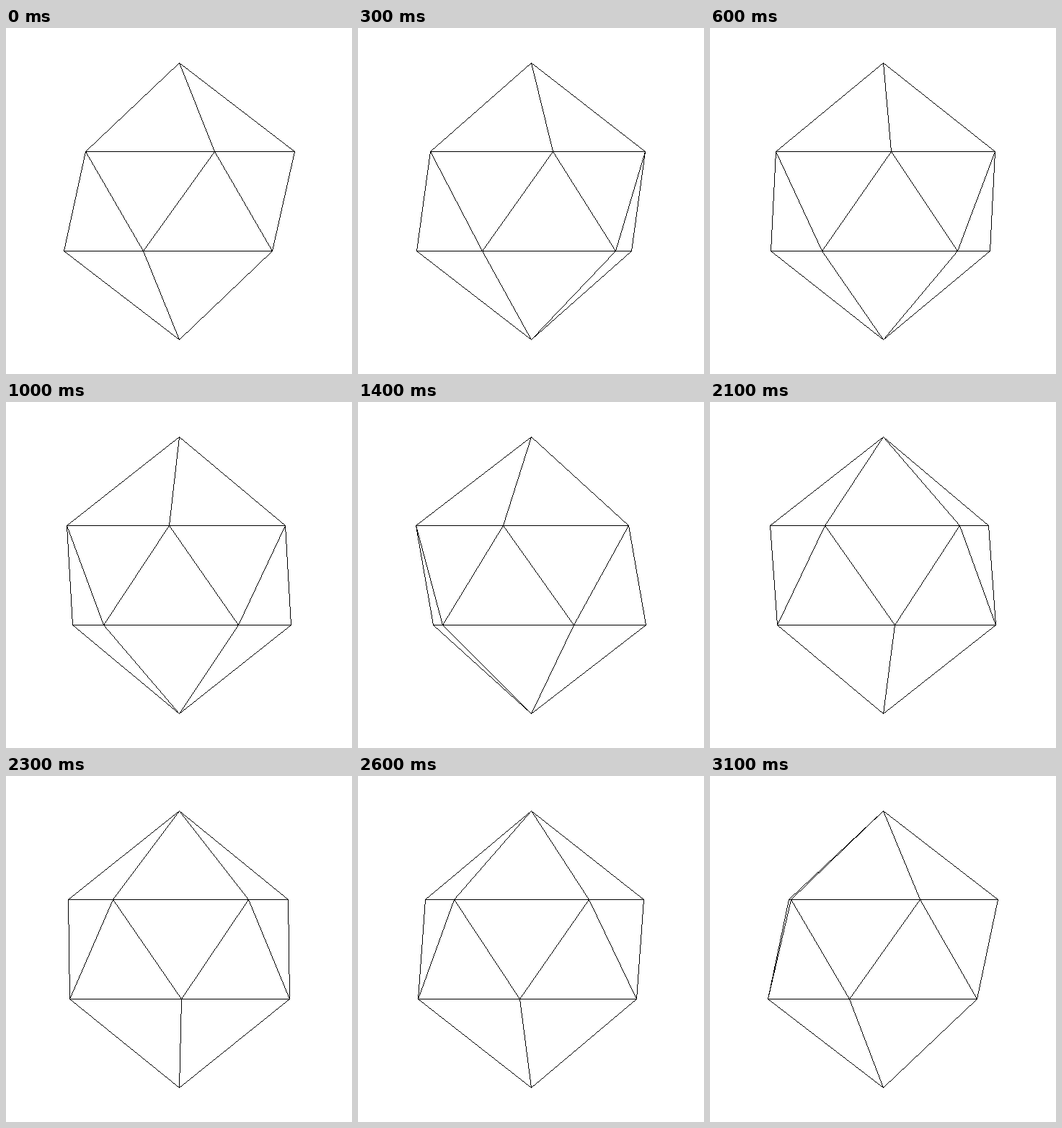
Recreate the animation shown at these times as an HTML page with a canvas. Size 480 px wide and 480 px high, loop 3200 ms.

```html
<!DOCTYPE html>
<html lang="en">
<head>
<meta charset="utf-8">
<title>Rotating icosahedron</title>
<style>
  html, body { margin: 0; width: 100%; height: 100%; overflow: hidden; background: #fff; }
  canvas { display: block; }
</style>
</head>
<body>
<canvas id="stage" width="480" height="480"></canvas>
<script>
const ctx = document.getElementById("stage").getContext("2d");
const CENTER = 240, RADIUS = 160;
const STEP_MS = 100, STEPS = 32, STEP_ANGLE = 0.04, START_ANGLE = Math.PI / 10;
const HALF_SIDE = Math.PI / 5;

const rings = [
  { y: 171, apexY: 48, otherY: 309, offset: 0 },
  { y: 309, apexY: 432, otherY: 171, offset: HALF_SIDE }
];

const point = (angle, y) => [Math.floor(CENTER + RADIUS * Math.sin(angle) + 1e-9), y];

// One-pixel Bresenham line without antialiasing, always drawn downwards.
function line(a, b) {
  if (a[1] > b[1]) [a, b] = [b, a];
  let [x, y] = a;
  const dx = Math.abs(b[0] - x), dy = b[1] - y, sx = Math.sign(b[0] - x);
  const steep = dy > dx;
  const major = steep ? dy : dx, minor = steep ? dx : dy;
  let error = 2 * minor - major;
  for (let i = 0; i <= major; i++) {
    ctx.fillRect(x, y, 1, 1);
    if (error >= 0) {
      if (steep) x += sx; else y++;
      error -= 2 * major;
    }
    error += 2 * minor;
    if (steep) y++; else x += sx;
  }
}

function draw(turn) {
  ctx.fillStyle = "#fff";
  ctx.fillRect(0, 0, 480, 480);
  ctx.fillStyle = "#000";
  for (const { y, apexY, otherY, offset } of rings) {
    for (let i = 0; i < 5; i++) {
      const angle = START_ANGLE + offset + i * 2 * HALF_SIDE - turn;
      const middle = angle + HALF_SIDE;
      if (Math.cos(middle) <= 0) continue; // both faces on this side point away
      const a = point(angle, y), b = point(middle + HALF_SIDE, y);
      line(a, b);
      for (const tip of [[CENTER, apexY], point(middle, otherY)]) {
        line(a, tip);
        line(b, tip);
      }
    }
  }
}

function tick() {
  const step = Math.floor(performance.now() / STEP_MS) % STEPS;
  draw(step * STEP_ANGLE);
  requestAnimationFrame(tick);
}
tick();
</script>
</body>
</html>
```
